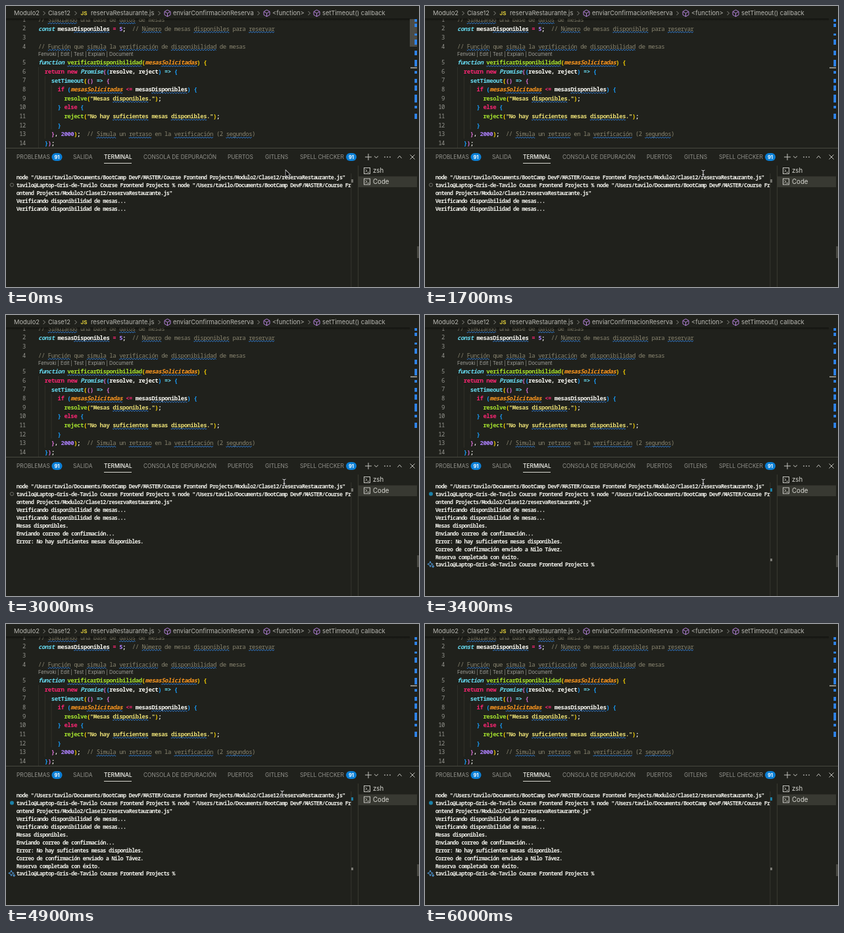
These frames come from a looping animation (628 by 428 pixels, 6100 ms). An HTML page with a canvas:

```html
<!DOCTYPE html>
<html lang="es">
<head>
<meta charset="utf-8">
<style>
html, body { margin: 0; width: 100%; height: 100%; overflow: hidden; background: #20211c; }
canvas { display: block; width: 628px; height: 428px; }
</style>
</head>
<body>
<canvas id="stage"></canvas>
<script>
const W = 628, H = 428, LOOP = 6100, STEP = 100;
const canvas = document.getElementById('stage');
const ctx = canvas.getContext('2d');
const UI = 'Inter, Roboto, sans-serif';
const MONO = '"Noto Sans Mono", "DejaVu Sans Mono", monospace';
const BG = '#20211c', BLUE = '#3794ff', LIGHT = '#ecece6', DIM = '#92928c';

const code = [
  '// Simulando una base de datos de mesas',
  'const mesasDisponibles = 5;  // Número de mesas disponibles para reservar',
  '',
  '// Función que simula la verificación de disponibilidad de mesas',
  'function verificarDisponibilidad(mesasSolicitadas) {',
  '  return new Promise((resolve, reject) => {',
  '    setTimeout(() => {',
  '      if (mesasSolicitadas <= mesasDisponibles) {',
  '        resolve("Mesas disponibles.");',
  '      } else {',
  '        reject("No hay suficientes mesas disponibles.");',
  '      }',
  '    }, 2000);  // Simula un retraso en la verificación (2 segundos)',
  '  });'
];
const CODE_X = 49, CODE_W = 4.925;
const TOKEN = /\/\/.*|"[^"]*"|\d+|[\wáéíóú]+|=>|<=|[^\s]/g;
const MISSPELT = /Simulando|datos|[Dd]isponibles|Número|reservar|Función|[Ss]imula\b|verificación|disponibilidad|verificarDisponibilidad|Solicitadas|suficientes|retraso|segundos/g;
const BRACKETS = ['#ffd700', '#da70d6', '#179fff'];
const STYLES = [
  [/^\/\//, '#88846f', '400'],
  [/^"/, '#e6db74', '600'],
  [/^\d/, '#ae81ff', '600'],
  [/^(const|function)$/, '#66d9ef', 'italic 600'],
  [/^(return|new|if|else|<=|=)$/, '#f92672', '600'],
  [/^Promise$/, '#66d9ef', 'italic 600'],
  [/^(setTimeout|=>)$/, '#66d9ef', '600'],
  [/^mesasSolicitadas$/, '#fd971f', 'italic 600'],
  [/^mesasDisponibles$/, '#f8f8f2', '700'],
  [/^verificarDisponibilidad$/, '#a6e22e', '600'],
  [/./, '#f8f8f2', '600']
];

const home = '/Users/tavilo/Documents/BootCamp DevF/MASTER/Course Fr';
const prompt = 'tavilo@Laptop-Gris-de-Tavilo Course Frontend Projects %';
const file = 'ontend Projects/Modulo2/Clase12/reservaRestaurante.js"';
const CHECKED = 1900, SENT = 3400;
const output = [
  [0, 'node "' + home + file],
  [0, prompt + ' node "' + home],
  [0, file],
  [0, 'Verificando disponibilidad de mesas...'],
  [0, 'Verificando disponibilidad de mesas...'],
  [CHECKED, 'Mesas disponibles.'],
  [CHECKED, 'Enviando correo de confirmación...'],
  [CHECKED, 'Error: No hay suficientes mesas disponibles.'],
  [SENT, 'Correo de confirmación enviado a Nilo Távez.'],
  [SENT, 'Reserva completada con éxito.'],
  [SENT, prompt]
];

function rect(x, y, w, h, color) {
  ctx.fillStyle = color;
  ctx.fillRect(x, y, w, h);
}

function line(points, color, width = 1, close = false) {
  ctx.beginPath();
  points.forEach(([x, y]) => ctx.lineTo(x, y));
  if (close) ctx.closePath();
  ctx.strokeStyle = color;
  ctx.lineWidth = width;
  ctx.stroke();
}

function label(text, x, y, size, color, weight = 400, align = 'left') {
  ctx.font = `${weight} ${size}px ${UI}`;
  ctx.letterSpacing = '0px';
  ctx.textAlign = align;
  ctx.fillStyle = color;
  ctx.fillText(text, x, y + size * 0.36);
}

function mono(text, x, y, size, pitch, color, style = '') {
  ctx.font = `${style} ${size}px ${MONO}`;
  ctx.letterSpacing = '0px';
  ctx.letterSpacing = pitch - ctx.measureText('0').width + 'px';
  ctx.textAlign = 'left';
  ctx.fillStyle = color;
  ctx.fillText(text, x, y + size * 0.34);
}

function chevron(x, y, dx, dy, color) {
  line(dx ? [[x - dx, y - 3], [x + dx, y], [x - dx, y + 3]]
          : [[x - 3, y - dy], [x, y + dy], [x + 3, y - dy]], color);
}

function cube(x, y) {
  const c = '#b180d7';
  line([[x, y - 5], [x + 4.5, y - 2.5], [x + 4.5, y + 2.5], [x, y + 5], [x - 4.5, y + 2.5], [x - 4.5, y - 2.5]], c, 1, true);
  line([[x - 4.5, y - 2.5], [x, y], [x + 4.5, y - 2.5]], c);
  line([[x, y], [x, y + 5]], c);
}

function squiggle(x, y, w) {
  const points = [];
  for (let i = 0; i <= w; i += 0.5) points.push([x + i, y + 0.8 * Math.sin(i * Math.PI / 2)]);
  line(points, BLUE, 0.9);
}

const lineY = n => n < 5 ? 34.5 + (n - 2) * 13.55 : 86.2 + (n - 5) * 13.62;

function drawCode() {
  ctx.save();
  ctx.beginPath();
  ctx.rect(0, 19, W, 197);
  ctx.clip();
  [216, 202, 188].forEach((bottom, i) => {
    const top = lineY(6 + i) - 6.8;
    rect(CODE_X + i * 2 * CODE_W, top, 0.7, bottom - top, '#383930');
  });
  let depth = 0;
  code.forEach((text, i) => {
    const y = lineY(i + 1), num = String(i + 1);
    mono(num, 30 - num.length * CODE_W, y, 8.8, CODE_W, '#969690', '500');
    for (const m of text.matchAll(TOKEN)) {
      const token = m[0], called = text[m.index + token.length] === '(';
      let [, color, style] = STYLES.find(s => s[0].test(token));
      if (/^(resolve|reject)$/.test(token) && called) color = '#a6e22e';
      if ('({'.includes(token)) color = BRACKETS[depth++ % 3];
      if (')}'.includes(token)) color = BRACKETS[--depth % 3];
      mono(token, CODE_X + m.index * CODE_W, y, 9, CODE_W, color, style);
    }
    for (const m of text.matchAll(MISSPELT)) {
      squiggle(CODE_X + m.index * CODE_W, y + 5.3, m[0].length * CODE_W);
    }
  });
  label('Fenvoki | Edit | Test | Explain | Document', CODE_X, 73.2, 7.5, '#a0a09a');
  const shadow = ctx.createLinearGradient(0, 19, 0, 23);
  shadow.addColorStop(0, 'rgba(15,15,12,.8)');
  shadow.addColorStop(1, 'rgba(15,15,12,0)');
  rect(0, 19, 614, 4, shadow);
  ctx.restore();
}

function drawRuler(slider) {
  if (slider > 0) rect(614, 20, 11, 42, `rgba(130,130,125,${0.45 * slider})`);
  const marks = [[20, 4], [27, 5], [42, 3], [51, 8], [68, 7], [82, 10], [99, 4],
    [111, 6], [121, 8], [135, 12], [152, 4], [164, 8]];
  marks.forEach(([y, h]) => rect(621.3, y, 3.7, h, '#2f86ee'));
  rect(615, 93.5, 10, 1.3, '#c8c8c2');
}

function drawBreadcrumb() {
  const c = '#b8b8b2', size = 9.4, y = 11;
  [[12, 'Modulo2'], [64, 'Clase12'], [129, 'reservaRestaurante.js'],
    [254, 'enviarConfirmacionReserva'], [405, '<function>'], [481, 'setTimeout() callback']]
    .forEach(([x, text]) => label(text, x, y, size, c));
  label('JS', 113.5, y, 8, '#e3d13b', 700);
  [58, 106, 233, 384, 461].forEach(x => chevron(x, y, 1.5, 0, '#8a8a84'));
  [245.5, 396.5, 472.5].forEach(x => cube(x, y));
}

function badge(x) {
  ctx.beginPath();
  ctx.roundRect(x - 8, 224, 16, 12, 6);
  ctx.fillStyle = '#0a7fd6';
  ctx.fill();
  label('91', x, 230, 7.6, '#fff', 700, 'center');
}

function drawTabs() {
  rect(0, 216, W, 1, '#47483f');
  [[16, 'PROBLEMAS'], [102, 'SALIDA'], [149, 'TERMINAL'], [209, 'CONSOLA DE DEPURACIÓN'],
    [337, 'PUERTOS'], [394, 'GITLENS'], [447, 'SPELL CHECKER']]
    .forEach(([x, text]) => {
      const active = text === 'TERMINAL';
      label(text, x, 230, 8.35, active ? '#f8f8f2' : DIM, active ? 500 : 400);
    });
  rect(149, 239, 42, 1, '#d8d8d0');
  badge(77.5);
  badge(525);
  const c = '#c5c5bf';
  line([[546, 230], [556, 230]], c);
  line([[551, 225], [551, 235]], c);
  chevron(563, 230, 0, 1.3, c);
  [576, 580, 584].forEach(x => rect(x - 0.8, 229.3, 1.5, 1.5, c));
  chevron(598.5, 230, 0, -1.8, c);
  line([[614.5, 226.5], [621.5, 233.5]], c);
  line([[621.5, 226.5], [614.5, 233.5]], c);
}

function shellRow(text, y) {
  const c = '#d8d8d2';
  ctx.strokeStyle = c;
  ctx.lineWidth = 0.9;
  ctx.strokeRect(544.5, y - 4.5, 9, 9);
  line([[546.5, y - 2], [548.8, y], [546.5, y + 2]], c, 0.9);
  line([[549.5, y + 2.3], [552, y + 2.3]], c, 0.9);
  label(text, 558, y, 9.7, c);
}

function drawTerminal(t) {
  const done = t >= SENT;
  output.forEach(([at, text], i) => {
    if (t >= at) mono(text, 15.7, 261.3 + i * 11.93, 8.5, 4.386, LIGHT, '600');
  });
  ctx.beginPath();
  ctx.arc(9, 272.5, done ? 3 : 2.6, 0, 7);
  if (done) {
    ctx.fillStyle = '#1b81a8';
    ctx.fill();
    star(8, 379.5, 4.2);
    star(12.2, 383, 1.8);
  } else {
    ctx.strokeStyle = '#777770';
    ctx.lineWidth = 0.9;
    ctx.stroke();
  }
  rect(524.5, 255, 0.8, 173, '#3a3b33');
  rect(525, 264, 3, 5, done ? '#1b81a8' : '#74746e');
  if (done) rect(525, 371, 3, 4, '#7a7a74');
  rect(535, 243, 1, 185, '#383931');
  rect(536, 259.5, 89, 16.5, '#383932');
  shellRow('zsh', 251);
  shellRow('Code', 267.5);
  rect(625, 366, 3, 18, '#484842');
}

function star(x, y, r) {
  const points = [];
  for (let i = 0; i < 8; i++) {
    const d = i % 2 ? r * 0.4 : r, a = i * Math.PI / 4;
    points.push([x + d * Math.cos(a), y + d * Math.sin(a)]);
  }
  line(points, '#5aa9f0', 0.9, true);
}

function arrow(x, y) {
  const shape = [[0, 0], [0, 9], [2.1, 7.2], [3.6, 10.4], [5, 9.8], [3.6, 6.6], [6.4, 6.4]];
  line(shape.map(([a, b]) => [x + a, y + b]), '#eee', 1.4, true);
  ctx.fillStyle = '#000';
  ctx.fill();
}

function beam(x, y) {
  [['#111', 2.4], ['#e8e8e8', 1]].forEach(([c, w]) => {
    line([[x - 2.5, y - 5], [x, y - 4], [x + 2.5, y - 5]], c, w);
    line([[x - 2.5, y + 5], [x, y + 4], [x + 2.5, y + 5]], c, w);
    line([[x, y - 4], [x, y + 4]], c, w);
    line([[x - 1.5, y + 1.5], [x + 1.5, y + 1.5]], c, w);
  });
}

const ramp = (t, a, b) => Math.max(0, Math.min(1, (t - a) / (b - a)));
const mix = (a, b, k) => a + (b - a) * k;
const ease = k => k * k * (3 - 2 * k);

function drawPointer(t) {
  if (t < 300) return arrow(425.5, 250.5);
  if (t >= 5600) return;
  const drift = ramp(t, 4400, 4500), leave = ease(ramp(t, 5000, 5300));
  beam(mix(mix(423, 420, drift), 500, leave), mix(mix(255, 259, drift), 18, leave));
}

function draw(t) {
  const slider = t < 5000 ? 1 - ramp(t, 100, 800) : ramp(t, 5000, 5200) - ramp(t, 5500, 6000);
  rect(0, 0, W, H, BG);
  drawCode();
  drawRuler(slider);
  drawBreadcrumb();
  drawTabs();
  drawTerminal(t);
  drawPointer(t);
}

const dpr = window.devicePixelRatio || 1;
canvas.width = W * dpr;
canvas.height = H * dpr;
ctx.scale(dpr, dpr);
const start = performance.now();
function tick() {
  const t = (performance.now() - start) % LOOP;
  draw(Math.floor(t / STEP) * STEP);
  requestAnimationFrame(tick);
}
tick();
</script>
</body>
</html>
```
